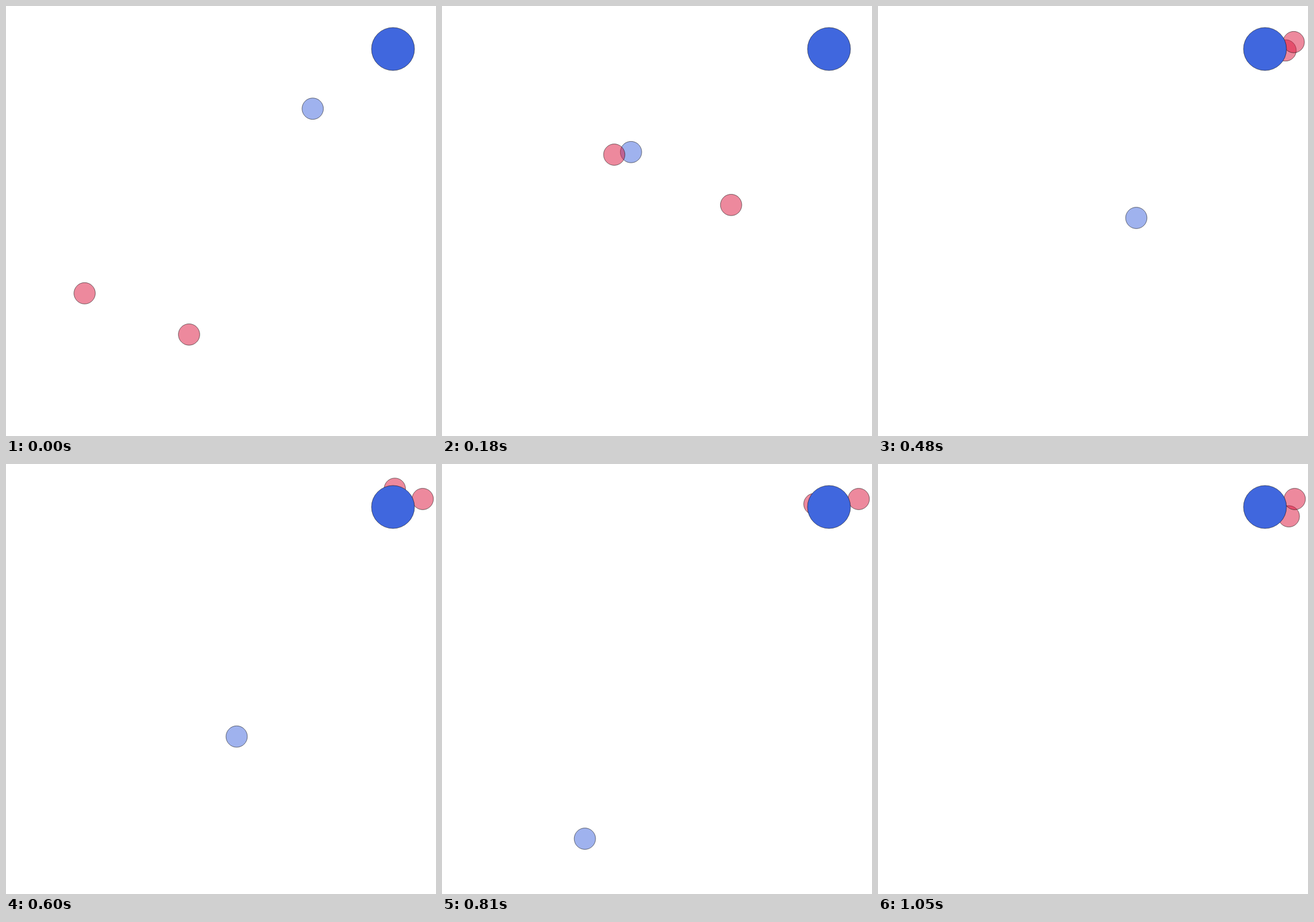
An HTML page with a canvas for the animation above (1080 ms loop, 700x700 px).

```html
<!DOCTYPE html>
<html lang="en">
<head>
<meta charset="utf-8">
<title>Seekers</title>
<style>
html, body { margin: 0; width: 100%; height: 100%; overflow: hidden; background: #fff; }
canvas { display: block; }
</style>
</head>
<body>
<canvas id="stage" width="700" height="700"></canvas>
<script>
const ctx = document.getElementById('stage').getContext('2d');
const STEP = 30, STEPS = 36;
const BLUE = '#4067de', RED = '#dc143c';

// Waypoints: step, x, y
const runner = [
  [0, 499.3, 167.2], [6, 307.7, 237.8], [10, 368.5, 200], [16, 420.5, 345],
  [20, 375.5, 443.7], [27, 232.6, 610], [35, 72, 810]
];
const orbiter = [
  [0, 128, 467.7], [6, 280.4, 242], [10, 431.5, 142.8], [16, 663.5, 72.3],
  [18, 682, 38], [20, 633, 40.3], [27, 606.2, 65.2], [35, 668.8, 85.2]
];
// Bezier control points
const settler = [[298, 534.8], [440.7, 388.8], [539.8, 207.9], [678.4, 57]];

const slope = (a, b, k) => (b[k] - a[k]) / (b[0] - a[0]);

// Velocity at waypoint i: neighbouring slopes weighted by time, relaxed at the ends
function velocity(path, i, k) {
  const p = path[i], prev = path[i - 1], next = path[i + 1];
  if (!prev) return 1.5 * slope(p, next, k) - 0.5 * velocity(path, i + 1, k);
  if (!next) return 1.5 * slope(prev, p, k) - 0.5 * velocity(path, i - 1, k);
  return (slope(prev, p, k) * (next[0] - p[0]) + slope(p, next, k) * (p[0] - prev[0])) /
    (next[0] - prev[0]);
}

// Smooth position through the waypoints
function along(path, step) {
  let i = 0;
  while (i < path.length - 2 && step >= path[i + 1][0]) i++;
  const a = path[i], b = path[i + 1];
  const d = b[0] - a[0], u = (step - a[0]) / d, w = 1 - u;
  return [1, 2].map(k =>
    w * w * (1 + 2 * u) * a[k] + u * u * (3 - 2 * u) * b[k] +
    d * u * w * (w * velocity(path, i, k) - u * velocity(path, i + 1, k)));
}

function bezier([a, b, c, d], u) {
  const w = 1 - u;
  return [0, 1].map(k =>
    w * w * w * a[k] + 3 * w * w * u * b[k] + 3 * w * u * u * c[k] + u * u * u * d[k]);
}

// Constant speed, then an even slowdown to rest at 1
function arrive(step, speed, brakeAt) {
  if (step < brakeAt) return speed * step;
  const rest = 1 - speed * brakeAt;
  const left = Math.max(0, 1 - (step - brakeAt) * speed / (2 * rest));
  return 1 - rest * left * left;
}

function disc([x, y], r, color, alpha) {
  ctx.beginPath();
  ctx.arc(x, y, r, 0, 2 * Math.PI);
  ctx.globalAlpha = alpha;
  ctx.fillStyle = color;
  ctx.fill();
  ctx.globalAlpha = 0.5;
  ctx.stroke();
}

function draw(now) {
  const step = Math.floor(now / STEP) % STEPS;
  ctx.clearRect(0, 0, 700, 700);
  disc(along(runner, step), 17.4, BLUE, 0.5);
  disc(along(orbiter, step), 17.4, RED, 0.5);
  disc(bezier(settler, arrive(step, 0.0745, 10)), 17.4, RED, 0.5);
  disc([630, 70], 35, BLUE, 1);
}

const start = performance.now();
function tick() {
  draw(performance.now() - start);
  requestAnimationFrame(tick);
}
tick();
</script>
</body>
</html>
```
